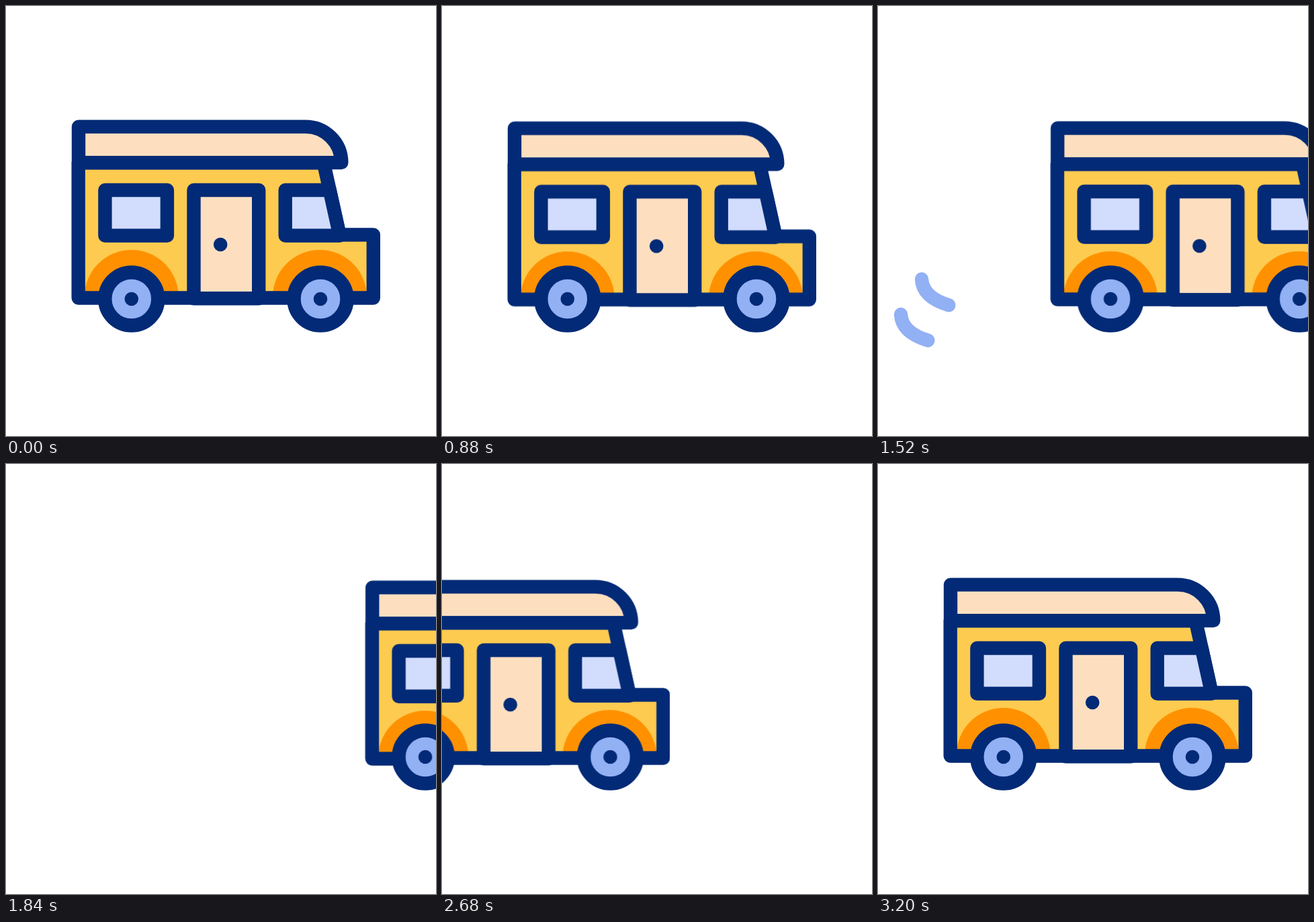
Recreate the animation shown at these times as an HTML page without scripts. Size 640x640 px, loop 3.22 s.

```html
<!DOCTYPE html>
<html lang="en">
<head>
<meta charset="utf-8">
<title>Camper van</title>
<style>
  html, body { margin: 0; width: 100%; height: 100%; overflow: hidden; background: #fff; }
  svg { display: block; width: 100%; height: 100%; }
  svg * { animation-duration: 3220ms; animation-iteration-count: infinite; }

  .line { stroke: #032a76; stroke-width: 20.4; stroke-linejoin: round; stroke-linecap: round; }
  .navy { fill: #032a76; }
  .yellow { fill: #fdcb50; }
  .peach { fill: #fddfc0; }
  .orange { fill: #ff9100; }
  .glass { fill: #d2dcfd; }
  .blue { fill: #92b0f4; }

  .van { animation-name: drive; animation-timing-function: cubic-bezier(.3333, 0, .6667, 1); }
  .cabin { animation-name: bob; animation-timing-function: linear; }
  .dust path {
    fill: none; stroke: #92b0f4; stroke-width: 20.4; stroke-linecap: round;
    stroke-dasharray: 100 100;
    animation-name: sweep, show;
    animation-timing-function: linear, step-end;
  }

  /* leave to the right, come back from the left */
  @keyframes drive {
    0%, 36.646% { transform: translateX(0); }
    68.323% { transform: translateX(611px); }
    68.324% { transform: translateX(-621px); }
    93.168%, 100% { transform: translateX(0); }
  }
  /* eight 400 ms bounces */
  @keyframes bob {
    0%, 12.422%, 24.845%, 37.267%, 49.689%, 62.112%, 74.534%, 86.957%, 99.379%, 100% { transform: translateY(0); }
    5.901%, 18.323%, 30.745%, 43.168%, 55.59%, 68.012%, 80.435%, 92.857% { transform: translateY(5.5px); }
  }
  @keyframes sweep {
    0%, 37.267% { stroke-dashoffset: 100; }
    44.534% { stroke-dashoffset: 0; }
    51.584%, 100% { stroke-dashoffset: -100; }
  }
  @keyframes show {
    0% { stroke-opacity: 0; }
    37.267% { stroke-opacity: 1; }
    51.584%, 100% { stroke-opacity: 0; }
  }
</style>
</head>
<body>
<svg viewBox="0 0 640 640">
  <defs>
    <path id="arch" class="orange" d="M-70 434V433A70 70 0 0 1 70 433V434Z"/>
    <g id="wheel">
      <circle class="line blue" r="39.5"/>
      <circle class="navy" r="10.3"/>
    </g>
  </defs>

  <g class="dust">
    <path pathLength="100" d="M110 508.5L75 498C50 490.5 35 478 34 459"/>
    <path pathLength="100" d="M141 456L106 445.5C81 438 66 425.5 65 406.5"/>
  </g>

  <g class="van">
    <g class="cabin">
      <path class="yellow" d="M107.7 233.3H472.7L496.5 340.5H546.8V434.5H107.7Z"/>
      <use href="#arch" x="186.8"/>
      <use href="#arch" x="467"/>
      <path class="line" fill="none" d="M107.7 233.3H472.7L496.5 340.5H546.8V434.5H107.7Z"/>
      <path class="line peach" d="M108 179.6H445.8A53.5 53.5 0 0 1 499.3 233.1H108Z"/>
      <path class="line glass" d="M147.4 274H239.9V341.7H147.4Z"/>
      <path class="line glass" d="M481.7 274H415.7V341.7H496.7Z"/>
      <path class="line peach" d="M279.5 274H376.2V435.2H279.5Z"/>
      <circle class="navy" cx="319.2" cy="355" r="10.3"/>
    </g>
    <use href="#wheel" x="186.8" y="436"/>
    <use href="#wheel" x="468" y="436"/>
  </g>
</svg>
</body>
</html>
```
